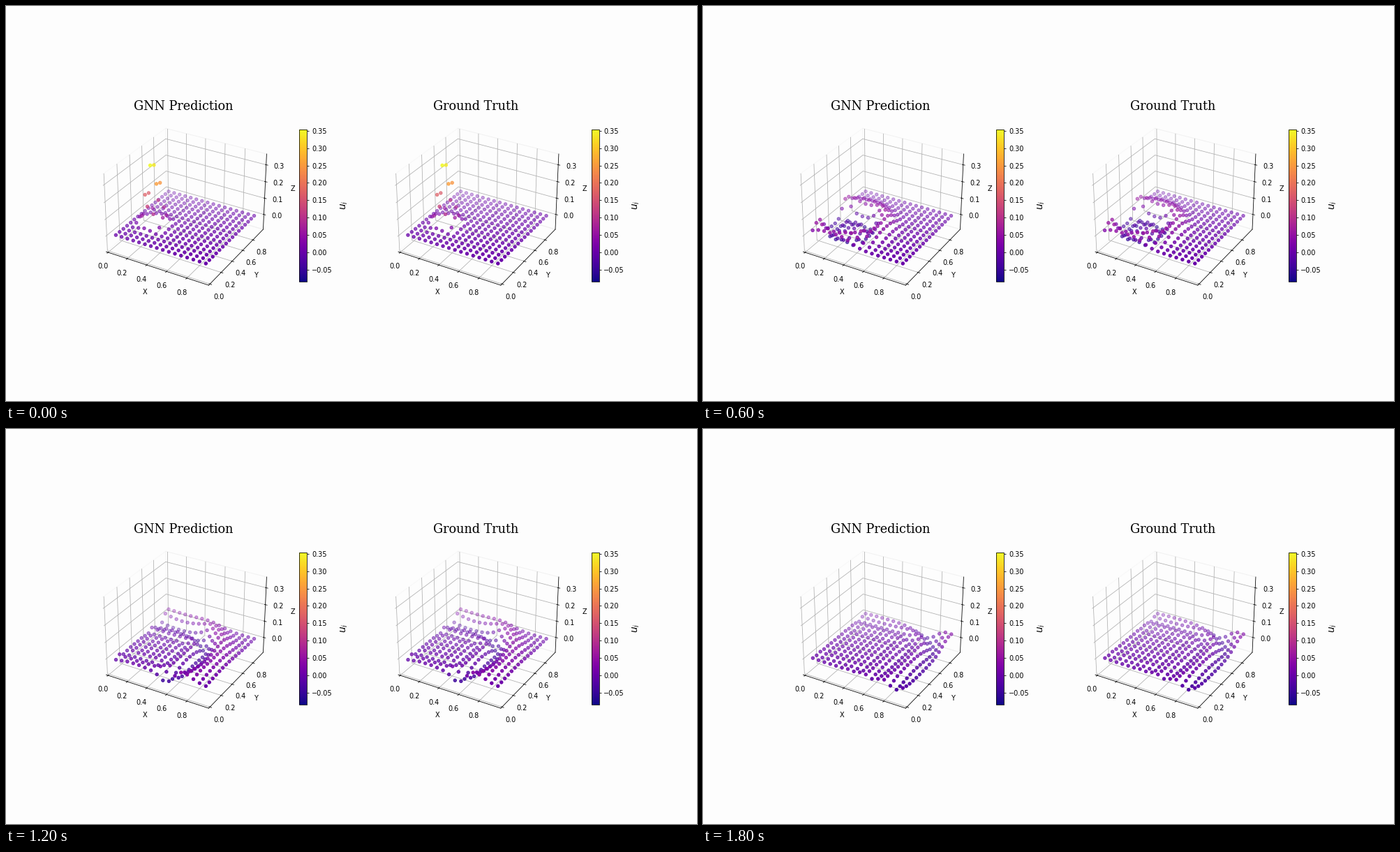
These frames come from a looping animation (990x566 px, 2 s). A matplotlib script:

```python
import numpy as np
import matplotlib.pyplot as plt
from matplotlib.animation import FuncAnimation

W, H = 990, 566
DPI = W / 14
FRAMES, INTERVAL = 10, 200
N, PAD = 16, 14
SPEED, SUBSTEPS = 1.65, 12  # grid cells per frame, solver steps per frame
U_MIN, U_MAX = -0.0842, 0.354
LOW, HIGH = 0.045, 0.945  # extent of the point grid
PAPER = "#fdfdfd"


def laplacian(u):
    p = np.pad(u, 1)
    return p[2:, 1:-1] + p[:-2, 1:-1] + p[1:-1, 2:] + p[1:-1, :-2] - 4 * u


def simulate():
    """Spread a Gaussian pulse on a padded grid and keep the inner square."""
    idx = np.arange(-PAD, N + PAD)
    i, j = np.meshgrid(idx, idx, indexing="ij")
    u = 0.4025 * np.exp(-((i - 3.19) ** 2 + (j - 5.46) ** 2) / (2 * 0.98 ** 2))
    k = (SPEED / SUBSTEPS) ** 2
    prev = u + 0.5 * k * laplacian(u)
    inner = slice(PAD, PAD + N)
    states = [u[inner, inner].ravel()]
    for _ in range(FRAMES - 1):
        for _ in range(SUBSTEPS):
            u, prev = 2 * u - prev + k * laplacian(u), u
        states.append(u[inner, inner].ravel())
    return states


def widen(low, high, share):
    extra = (high - low) * share
    return low - extra, high + extra


def make_panel(pos, title):
    ax = fig.add_subplot(1, 2, pos, projection="3d")
    ax.set_facecolor("none")
    ax.set_title(title, fontsize=18, fontfamily="DejaVu Serif")
    ax.set(xlabel="X", ylabel="Y", zlabel="Z")
    for axis in (ax.xaxis, ax.yaxis, ax.zaxis):
        axis.pane.fill = False
    bar = fig.colorbar(shades, ax=ax, shrink=0.5, pad=0.1)
    bar.set_label("$u_i$", labelpad=10, fontsize=14)
    ticks = np.arange(5) * 0.2
    ax.set(xticks=ticks, yticks=ticks)
    span = widen(*widen(LOW, HIGH, 0.05), 1 / 48)
    ax.set(xlim=span, ylim=span, zlim=widen(U_MIN, U_MAX, 1 / 48))
    return ax


plt.rcParams["font.family"] = "DejaVu Sans"
# The tiny excess keeps float rounding from dropping a pixel.
fig = plt.figure(figsize=((W + 1e-6) / DPI, (H + 1e-6) / DPI), dpi=DPI,
                 facecolor=PAPER)
shades = plt.cm.ScalarMappable(plt.Normalize(U_MIN, U_MAX), "plasma")
panels = [make_panel(1, "GNN Prediction"), make_panel(2, "Ground Truth")]

side = np.linspace(LOW, HIGH, N)
X, Y = (g.ravel() for g in np.meshgrid(side, side, indexing="ij"))
states = simulate()
clouds = []


def draw(n):
    while clouds:
        clouds.pop().remove()
    u = states[n]
    for ax in panels:
        clouds.append(ax.scatter(X, Y, u, c=u, cmap="plasma",
                                 vmin=U_MIN, vmax=U_MAX))
    return clouds


anim = FuncAnimation(fig, draw, frames=FRAMES, interval=INTERVAL,
                     init_func=lambda: draw(0), repeat=True, repeat_delay=0)
plt.show()
```
